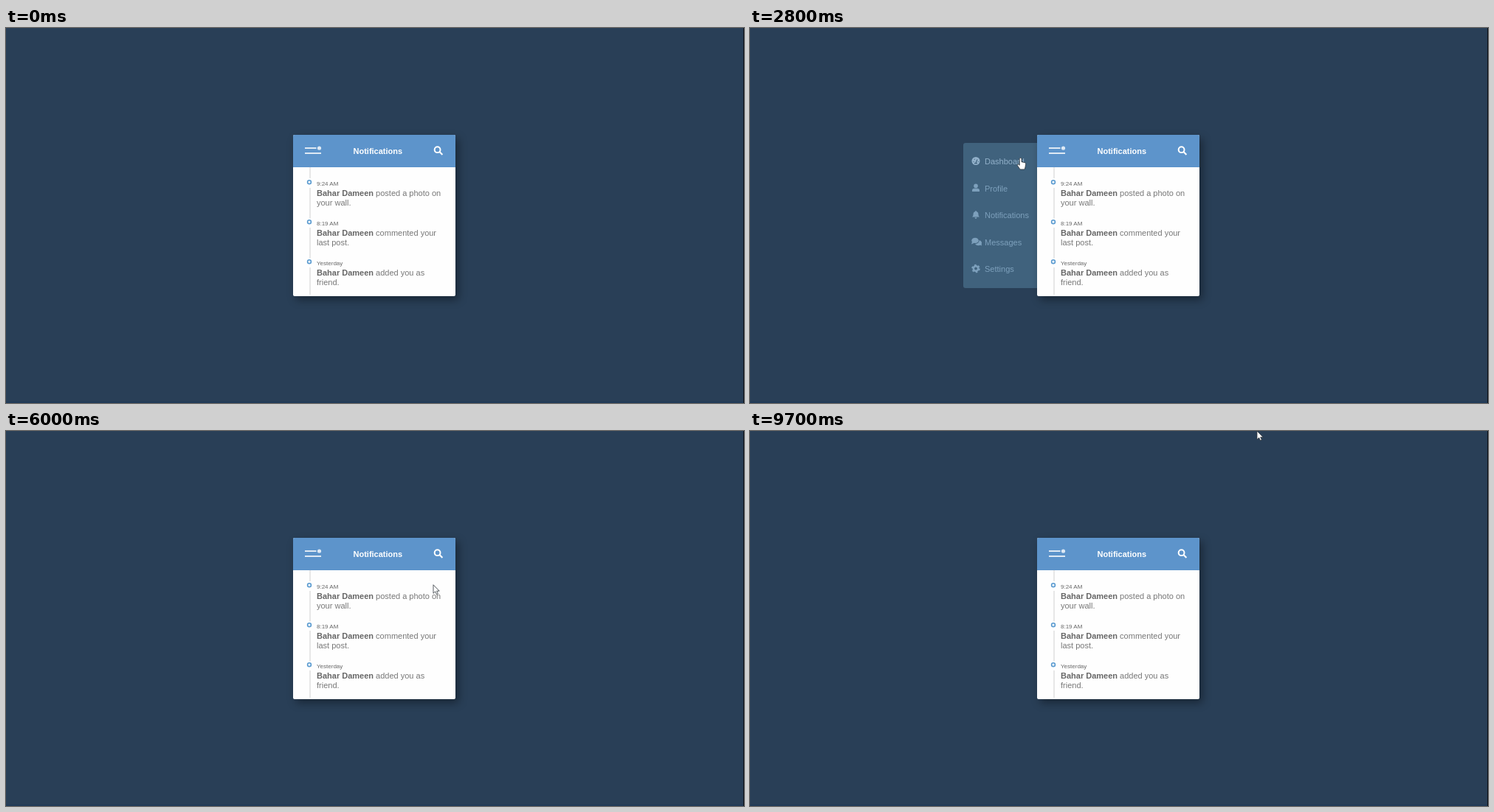
An HTML page that plays this animation: 1000x509 px, repeating every 10000 ms.

```html
<!DOCTYPE html>
<html lang="en">
<head>
<meta charset="utf-8">
<title>Notifications</title>
<style>
  html, body { margin: 0; width: 100%; height: 100%; overflow: hidden; background: #293f57; }
  svg { display: block; width: 100%; height: 100%; font: 11px "Liberation Sans", Arial, sans-serif; }
  .shadow { filter: drop-shadow(4px 5px 6px rgba(0, 0, 0, .38)); }
  .bold { font-weight: bold; }
  .line { fill: none; stroke: #fff; stroke-width: 2; }
  .cut { fill: none; stroke: #40627d; stroke-width: 1.2; }
</style>
</head>
<body>
<svg viewBox="0 0 1000 509" preserveAspectRatio="none">
  <rect width="1000" height="509" fill="#293f57"/>
  <rect y="507" width="1000" height="2" fill="#213a58"/>
  <rect x="999" width="1" height="509" fill="#0a0f16"/>

  <g id="menu">
    <rect x="289" y="156" width="110" height="197" rx="3" fill="#40627d"/>
    <g id="items"></g>
  </g>

  <rect class="shadow" x="389" y="145" width="220" height="219" rx="2" fill="#fefefe"/>
  <path d="M389 189V147q0-2 2-2H607q2 0 2 2V189z" fill="#5d94cb"/>
  <g id="posts"></g>

  <g id="burger">
    <path class="line" d="M405 163H420.5M405 170H427"/>
    <circle cx="424.5" cy="163" r="2.6" fill="#fff"/>
  </g>
  <text class="bold" x="470.5" y="170.5" fill="#fff">Notifications</text>
  <circle class="line" cx="584.6" cy="165.2" r="3.9"/>
  <path class="line" d="M587.4 168L591.4 172"/>

  <g id="search">
    <rect x="401" y="155" width="142.5" height="24" rx="12" fill="#fff"/>
    <g id="ring" fill="none">
      <rect x="399.8" y="153.8" width="144.9" height="26.4" rx="13.2" stroke="#fff"/>
      <rect x="401" y="155" width="142.5" height="24" rx="12" stroke="#141a24" stroke-width="1.6"/>
    </g>
    <text x="412.5" y="170.3" font-size="10" fill="#777">Search ...</text>
  </g>

  <g id="cursor" fill="#fff" stroke="#2b3138" stroke-width=".8" stroke-linejoin="round">
    <path id="arrow" d="M0 0V11.6L2.7 9.1 4.5 13 6.4 12.1 4.7 8.4H8.2z"/>
    <path id="hand" d="M-1.5 1.4a1.4 1.4 0 0 1 2.8 0V5.4L5.6 6.3Q7.2 6.8 7 8.4L6.3 12.6 5.4 15.6H-.6L-4.2 10.4Q-4.8 8.6-3.1 8.6L-1.5 10z"/>
    <path id="beam" fill="none" d="M-2.5-6Q0-6 0-5 0-6 2.5-6M0-5V5M-2.5 6Q0 6 0 5 0 6 2.5 6"/>
  </g>
</svg>
<script>
const $ = id => document.getElementById(id);
const LOOP = 10000, STEP = 100, ROW = 36.5;

// Icons are centred on 0,0
const menuItems = [
  ["Dashboard", '<circle r="5.5"/><path class="cut" d="M0 2.5L2-2M-3.5 1H-2.5M-2-2.5l.6.6M2.8 1H3.8M-2 3.2H2"/>'],
  ["Profile", '<circle cy="-2.6" r="2.8"/><path d="M-5 5V3.5Q-5 .8-2.2.8H2.2Q5 .8 5 3.5V5z"/>'],
  ["Notifications", '<path d="M-5 3Q-3.4 1.6-3.4-1-3.4-4-.6-4.6V-5.6H.6V-4.6Q3.4-4 3.4-1 3.4 1.6 5 3zM-1.5 3.8H1.5Q1.2 5.4 0 5.4T-1.5 3.8z"/>'],
  ["Messages", '<ellipse cx="3.4" cy="1.6" rx="4.6" ry="3.7"/><path d="M5 4L8 5.6 7.4 2z"/><ellipse class="cut" cx="-1" cy="-1.6" rx="5" ry="4"/><ellipse cx="-1" cy="-1.6" rx="4.7" ry="3.7"/><path d="M-5 0L-6 3.4-2 1.8z"/>'],
  ["Settings", '<circle r="3.2" fill="none" stroke="currentColor" stroke-width="2.6"/><circle r="4.8" fill="none" stroke="currentColor" stroke-width="2" stroke-dasharray="2.5 2.527"/>']
];
$("items").innerHTML = menuItems.map(([name, icon], i) => {
  const y = 181 + i * ROW;
  return `<g fill="currentColor"><g transform="translate(306 ${y - .5})">${icon}</g><text x="318" y="${y + 4}">${name}</text></g>`;
}).join("");
const itemNodes = [...$("items").children];

const posts = [
  ["9:24 AM", "posted a photo on", "your wall."],
  ["8:19 AM", "commented your", "last post."],
  ["Yesterday", "added you as", "friend."]
];
$("posts").innerHTML = '<path d="M412 189V204" stroke="#ddd" stroke-width="1.4"/>' + posts.map(([time, first, second], i) => `
  <g transform="translate(0 ${i * 54})" fill="#777">
    <path d="M412 217V${i < 2 ? 258.5 : 254}" stroke="#ddd" stroke-width="1.4"/>
    <circle cx="411" cy="209.2" r="2.4" fill="#fff" stroke="#5a9bd0" stroke-width="1.6"/>
    <text x="421" y="213.5" font-size="8" fill="#666">${time}</text>
    <text x="421" y="228"><tspan class="bold" fill="#666">Bahar Dameen</tspan> ${first}</text>
    <text x="421" y="240.7">${second}</text>
  </g>`).join("");

// Pointer path: time, x, y
const path = [
  [500, 712, 61], [1000, 575, 128], [1500, 420, 168], [2550, 420, 168],
  [2850, 356, 178], [3200, 352, 215], [3500, 352, 255], [3750, 354, 292],
  [3900, 354.5, 329], [4000, 355, 330], [4400, 419, 168], [4650, 419, 168],
  [5000, 417, 184], [5400, 470, 230], [5900, 560, 215], [6300, 636, 190],
  [6700, 600, 172], [6900, 582, 167], [7250, 582, 167], [7650, 470, 167],
  [8000, 470, 167], [8400, 589, 169], [8800, 589, 169], [9100, 602, 150],
  [9700, 687, 0]
];

function pointer(t) {
  const i = path.findIndex(p => p[0] > t);
  if (i < 0) return path.at(-1).slice(1);
  if (i === 0) return path[0].slice(1);
  const [t0, x0, y0] = path[i - 1], [t1, x1, y1] = path[i];
  const k = (t - t0) / (t1 - t0);
  return [x0 + (x1 - x0) * k, y0 + (y1 - y0) * k];
}

function ease(t, from, to) {
  const k = Math.min(1, Math.max(0, (t - from) / (to - from)));
  return k * k * (3 - 2 * k);
}

const menuOpen = t => ease(t, 1800, 2300) - ease(t, 4500, 4900);
const searchOpen = t => ease(t, 6950, 7250) - ease(t, 8700, 9000);
const near = (v, centre, reach) => Math.abs(v - centre) <= reach;

function hoveredItem(t) {
  const [x, y] = pointer(t);
  return menuOpen(t) > .9 && x < 389 ? Math.floor((y - 163) / ROW) : -1;
}

// Hover colour fades over about 300 ms
function glow(t, item) {
  let sum = 0;
  for (let d = 0; d < 300; d += 50) sum += hoveredItem(t - d) === item;
  return sum / 6;
}

function draw(t) {
  $("menu").setAttribute("transform", `translate(${100 * (1 - menuOpen(t))} 0)`);
  itemNodes.forEach((node, i) => {
    const g = glow(t, i);
    node.style.color = `rgb(${125 + 42 * g},${160 + 34 * g},${188 + 28 * g})`;
  });

  const open = searchOpen(t);
  $("search").setAttribute("transform", `translate(${12 * (1 - open)} 0)`);
  $("search").style.opacity = open;
  $("ring").style.opacity = +(t >= 7900 && t < 8700);

  const [x, y] = pointer(t);
  const onBurger = near(x, 416, 16) && near(y, 167, 10) && open < .5;
  const onSearch = near(x, 586, 10) && near(y, 167, 10);
  const onInput = open > .9 && near(x, 472, 71) && near(y, 167, 12);
  const shape = onInput ? "beam" : onBurger || onSearch || hoveredItem(t) >= 0 ? "hand" : "arrow";
  for (const id of ["arrow", "hand", "beam"]) $(id).style.display = id === shape ? "" : "none";
  $("cursor").setAttribute("transform", `translate(${x} ${y})`);
  $("cursor").style.opacity = +(t >= 500);
  $("burger").style.opacity = onBurger || near(t, 5000, 300) ? 1 : .8;
}

const start = performance.now();
function tick() {
  const t = (performance.now() - start) % LOOP;
  draw(Math.floor(t / STEP) * STEP);
  requestAnimationFrame(tick);
}
tick();
</script>
</body>
</html>
```
